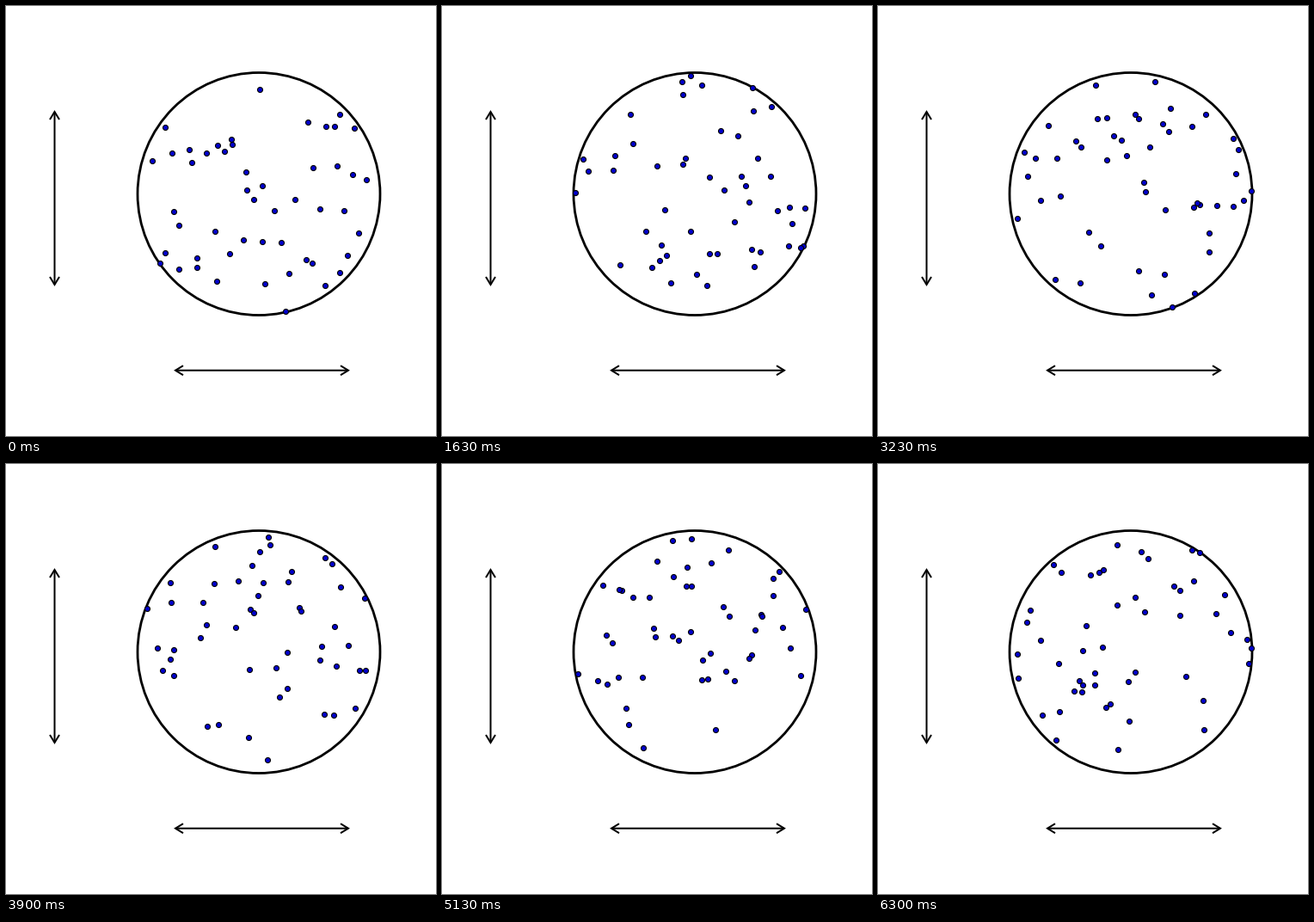
Write a matplotlib script that moves like this. It is 500 px wide and 500 px high and loops after 6.33 s.

```python
import numpy as np
import matplotlib.pyplot as plt
from matplotlib.animation import FuncAnimation

SIZE, DPI = 500, 100
PX = 72 / DPI  # points per pixel
FRAMES, INTERVAL = 211, 30
STEPS = 113  # distinct poses in one loop
DT = FRAMES * INTERVAL / 1000 / STEPS
CENTER, RADIUS = np.array([293.5, 218.0]), 141.0
BALLS = 50


def polar(radius, angle):
    return np.column_stack([radius * np.cos(angle), radius * np.sin(angle)])


def simulate():
    """Straight flight with mirror reflection at the round wall."""
    rng = np.random.default_rng(7)
    pos = polar(RADIUS * np.sqrt(rng.random(BALLS)),
                rng.uniform(0, 2 * np.pi, BALLS))
    vel = polar(rng.uniform(40, 90, BALLS), rng.uniform(0, 2 * np.pi, BALLS))
    track = [pos]
    for _ in range(STEPS - 1):
        pos = pos + vel * DT
        dist = np.linalg.norm(pos, axis=1, keepdims=True)
        normal = pos / dist
        outward = (vel * normal).sum(axis=1, keepdims=True)
        hit = dist > RADIUS
        vel = np.where(hit & (outward > 0), vel - 2 * outward * normal, vel)
        pos = np.where(hit, normal * (2 * RADIUS - dist), pos)
        track.append(pos)
    return np.array(track) + CENTER


def double_arrow(ax, start, end, length=9, half=5.5):
    start, end = np.array(start, float), np.array(end, float)
    along = (end - start) / np.linalg.norm(end - start)
    side = half * np.array([-along[1], along[0]])
    style = dict(color="black", lw=2 * PX, snap=False,
                 solid_joinstyle="miter", solid_capstyle="butt")
    ax.plot(*np.array([start, end]).T, **style)
    for tip, back in ((start, length * along), (end, -length * along)):
        ax.plot(*np.array([tip + back + side, tip, tip + back - side]).T,
                **style)


fig = plt.figure(figsize=(SIZE / DPI, SIZE / DPI), dpi=DPI, facecolor="white")
ax = fig.add_axes([0, 0, 1, 1])
ax.set_xlim(-0.5, SIZE - 0.5)
ax.set_ylim(SIZE - 0.5, -0.5)
ax.axis("off")
ax.set_autoscale_on(False)

ax.add_patch(plt.Circle(CENTER, RADIUS, fill=False, ec="black", lw=2.8 * PX))
double_arrow(ax, (56, 122.5), (56, 323.5))
double_arrow(ax, (196.5, 423.2), (397.5, 423.2))

track = simulate()
dots, = ax.plot(*track[0].T, ls="none", marker="o", ms=6 * PX,
                mfc="#0000cd", mec="black", mew=1.1 * PX, zorder=5)


def draw(i):
    dots.set_data(*track[i * STEPS // FRAMES].T)
    return dots,


anim = FuncAnimation(fig, draw, frames=FRAMES, interval=INTERVAL,
                     repeat=True, repeat_delay=0, blit=False)
plt.show()
```
